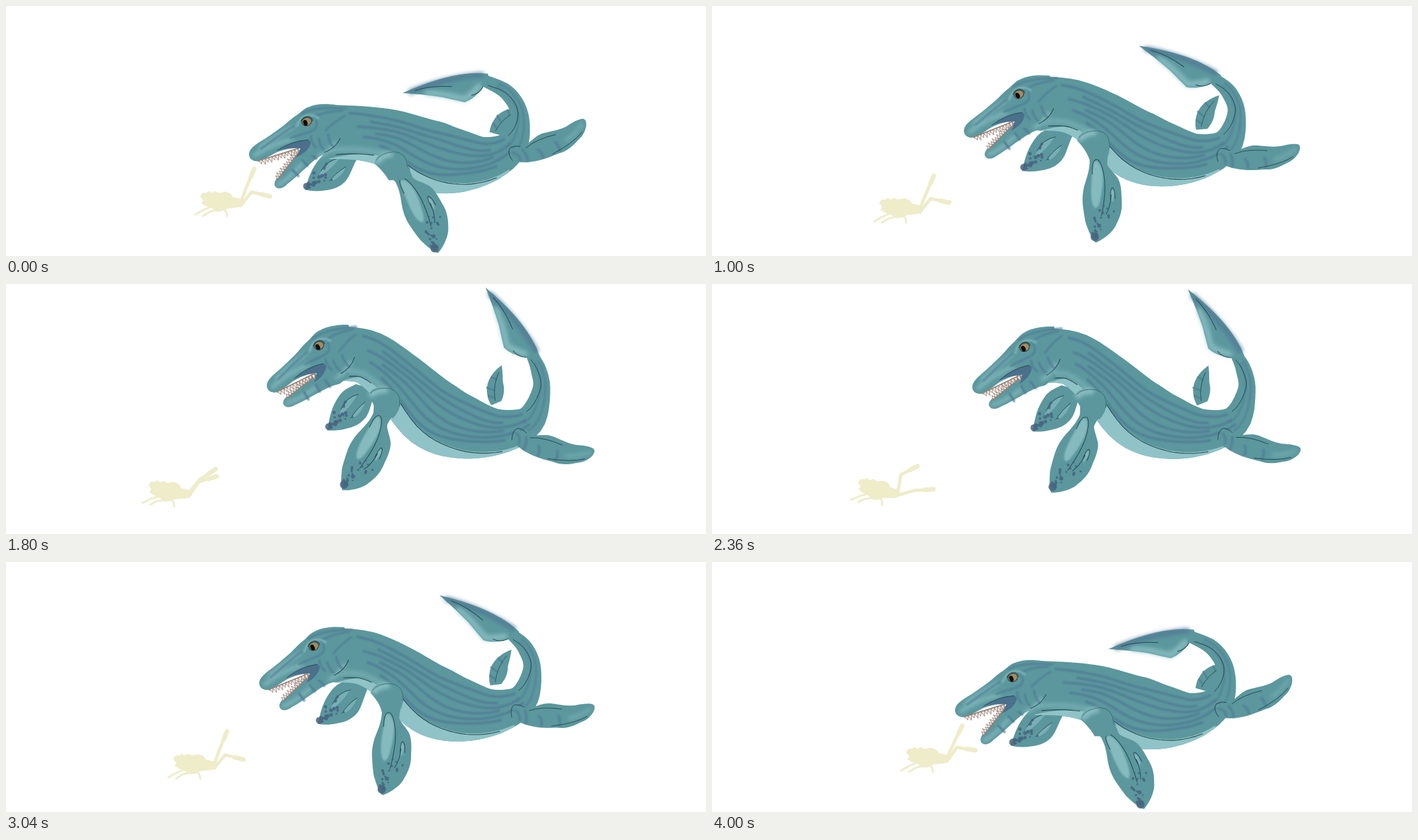
An HTML page that plays this animation: 1080 by 387 pixels, repeating every 4040 ms.

```html
<!DOCTYPE html>
<html lang="en">
<head>
<meta charset="utf-8">
<title>Marine reptile and diver</title>
<style>
html, body { margin: 0; width: 100%; height: 100%; overflow: hidden; background: #fff; }
svg { display: block; width: 100%; height: 100%; }
</style>
</head>
<body>
<svg id="stage" viewBox="0 0 1080 387" fill="none" stroke-linecap="round" stroke-linejoin="round">
  <defs>
    <filter id="soft" filterUnits="userSpaceOnUse" x="-300" y="-300" width="1500" height="1000"><feGaussianBlur stdDeviation="1.3"/></filter>
    <filter id="haze" filterUnits="userSpaceOnUse" x="-300" y="-300" width="1500" height="1000"><feGaussianBlur stdDeviation="3"/></filter>
  </defs>
</svg>
<script>
const LOOP = 4040, TAU = 2 * Math.PI;
const SKIN = '#5b979d', DARK = '#517a94', LIGHT = '#8fc3c7', INK = '#24474f', SPOT = '#48637f', CREAM = '#efecca';
const stage = document.getElementById('stage');
const parts = [], ribbons = [];

function make(tag, attrs = {}, parent = stage) {
  const el = document.createElementNS('http://www.w3.org/2000/svg', tag);
  for (const k in attrs) el.setAttribute(k, attrs[k]);
  return parent.appendChild(el);
}
const fill = (parent, d, color, extra) => make('path', { d, fill: color, ...extra }, parent);
const line = (parent, d, color, width, extra) => make('path', { d, stroke: color, 'stroke-width': width, ...extra }, parent);
const lerp = (a, b, u) => a + (b - a) * u;

let seed = 7;
const rnd = () => (seed = seed * 16807 % 2147483647) / 2147483647;

// A rigid piece that slides and turns between the low and the high pose
function part(low, high, turn, parent = stage) {
  const el = make('g', {}, parent);
  parts.push({ el, low, high, turn });
  return el;
}

// Spots that shrink and spread away from the tip of a limb
function spots(parent, x, y, angle, reach, spread) {
  const dx = Math.cos(angle), dy = Math.sin(angle);
  const count = 20;
  for (let i = 0; i < count; i++) {
    const k = i / count, along = reach * k, side = (rnd() * 2 - 1) * (2 + spread * k);
    make('circle', {
      cx: x + dx * along - dy * side, cy: y + dy * along + dx * side,
      r: i ? 1.2 + 2.6 * rnd() * (1 - k * .6) : spread / 4.2, fill: SPOT, opacity: .85
    }, parent);
  }
}

function teeth(parent, x0, y0, x1, y1, size, count) {
  line(parent, `M${x0} ${y0}L${x1} ${y1}`, '#9d8781', 3);
  const dx = (x1 - x0) / count, dy = (y1 - y0) / count, len = Math.hypot(dx, dy);
  for (let i = 0; i < count; i++) {
    const h = size * (i % 2 ? .75 : 1) / len;
    fill(parent, `M${x0 + dx * i} ${y0 + dy * i}l${dx / 2 - dy * h} ${dy / 2 + dx * h} ${dx / 2 + dy * h} ${dy / 2 - dx * h}Z`,
      '#f1e8e0', { stroke: '#8b746c', 'stroke-width': .8 });
  }
}

// Spine from neck to fluke: low x, y, high x, y, half width
const spine = [
  [490, 195, 518, 107, 42], [548, 197, 560, 114, 42], [598, 207, 606, 149, 46],
  [652, 231, 658, 200, 55], [700, 240, 708, 222, 49], [747, 236, 762, 228, 35],
  [782, 213, 808, 211, 24], [792, 168, 826, 165, 14], [773, 134, 822, 133, 12], [737, 115, 812, 110, 9]
];

// Point at station u along the spine and v across it (-1 back, 1 belly)
function spinePoint(nodes, u, v) {
  const i = Math.min(Math.floor(u), nodes.length - 2), f = u - i;
  const [a, b, c, d] = [-1, 0, 1, 2].map(k => nodes[Math.max(0, Math.min(nodes.length - 1, i + k))]);
  const value = k => b[k] + f / 2 * (c[k] - a[k] + f * (2 * a[k] - 5 * b[k] + 4 * c[k] - d[k] + f * (3 * (b[k] - c[k]) + d[k] - a[k])));
  const rate = k => (c[k] - a[k] + 2 * f * (2 * a[k] - 5 * b[k] + 4 * c[k] - d[k]) + 3 * f * f * (3 * (b[k] - c[k]) + d[k] - a[k])) / 2;
  const tx = rate(0), ty = rate(1), s = value(2) * v / Math.hypot(tx, ty);
  return [value(0) - ty * s, value(1) + tx * s];
}

// A line along the spine, or with a second edge a filled strip
function ribbon(from, to, edge, attrs, parent, edge2) {
  ribbons.push({ el: make('path', attrs, parent), from, to, edge, edge2 });
}
function ribbonPath(nodes, { from, to, edge, edge2 }) {
  const steps = Math.ceil((to - from) * 6);
  const side = fn => Array.from({ length: steps + 1 }, (_, i) => {
    const k = i / steps, u = lerp(from, to, k);
    return spinePoint(nodes, u, fn(k)).map(n => n.toFixed(1)).join(' ');
  });
  return 'M' + side(edge).join('L') + (edge2 ? 'L' + side(edge2).reverse().join('L') + 'Z' : '');
}

// Diver
const diver = make('g', { stroke: CREAM });
const torso = make('g', {}, diver);
fill(torso, 'M-26-6Q-24-13-17-11L-14-14-9-11-4-14 2-11 12-13Q21-12 23-5L37-2 41 5 33 10 16 12 7 16 0 17-9 11-18 8-24 4-21 0Z', CREAM, { 'stroke-width': 1 });
line(torso, 'M-8 9L-22 15-34 22M-2 15L-13 18-22 24M10 13L14 18 15 24', CREAM, 3);
// Joint angles in degrees: mean, cosine and sine part of the kick
const legs = [
  { y: 3, thigh: [-67, -2, -17], shin: [-36, -31, -9] },
  { y: 8, thigh: [-37, -14, 16], shin: [-6, 19, 15] }
].map(leg => ({ ...leg, limb: line(diver, '', CREAM, 5), fin: line(diver, '', CREAM, 7) }));

// Far limbs
const farFore = part([529, 230], [556, 163], [2.3, -5.5]);
fill(farFore, 'M-15-10C-28-5-35-3-42 5C-58 24-60 38-66 57C-56 59-45 59-35 57C-20 55-12 50-5 43C4 33 6 18 15 2Z', SKIN);
fill(farFore, 'M-14 6Q-40 14-46 38Q-26 24-14 6M-4 20Q-22 30-28 44Q-10 36-4 20', LIGHT, { opacity: .55 });
line(farFore, 'M-13 6Q-33 9-42 27M-4 19Q-20 30-28 42', INK, .9);
spots(farFore, -62, 53, -.72, 48, 22);

const farHind = part([754, 197], [756, 184], [19, -20]);
fill(farHind, 'M-8 1C-10-8-9-14-8-18C-5-34 8-46 28-52C26-42 24-36 21-27C20-15 16-8 9 0Z', SKIN);
line(farHind, 'M-5-27L3-20M-7-14L-1-9M7-40L13-34', DARK, 3, { opacity: .7 });
line(farHind, 'M20-43Q4-27 0-4', INK, .8);

// Fluke and body
const fluke = part([737, 115], [812, 110], [-189, -124]);
fill(fluke, 'M-8 9Q18 16 50 14T127 0Q92-8 67-16Q50-23 34-29Q17-26 2-9Q-10-4-8 9Z', SKIN);
line(fluke, 'M8-8Q22-19 34-24L64-12 90-5', LIGHT, 9, { filter: 'url(#haze)', opacity: .8 });
line(fluke, 'M2 9Q25 11 55 9T114 0', DARK, 7, { filter: 'url(#haze)' });
line(fluke, 'M50-2Q80 5 107 1M2-9Q10-20 22-20', INK, 1);

ribbon(0, 9, () => -1, { fill: SKIN }, stage, () => 1);
const haze = make('g', { filter: 'url(#haze)' }), soft = make('g', { filter: 'url(#soft)' });
const bellyLine = k => lerp(.42, .9, k);
ribbon(2, 5.4, bellyLine, { fill: LIGHT }, stage, () => 1);
ribbon(.2, 2.6, k => .98 - .3 * Math.sin(k * 2.4), { fill: LIGHT }, stage, () => 1);
ribbon(2.2, 5, k => bellyLine(k) - .04, { stroke: SKIN, 'stroke-width': 7 }, soft);
ribbon(.3, 2, k => .65 - .1 * k, { stroke: '#75adb2', 'stroke-width': 7 }, haze);
for (let i = 0; i < 6; i++) {
  const v = -.72 + .22 * i, odd = i % 2;
  ribbon(.7 + .45 * odd + .1 * i, 5.9 - .8 * odd, k => v + .05 * Math.sin(k * 7 + i) + .08 * k,
    { stroke: DARK, 'stroke-width': 4, opacity: .75 }, soft);
}
for (const v of [-.1, .45])
  ribbon(5.8, 8.4, () => v, { stroke: DARK, 'stroke-width': 3, opacity: .6 }, soft);
ribbon(2.1, 5, bellyLine, { stroke: INK, 'stroke-width': 1.1 }, stage);
ribbon(.4, 1.5, k => .83 - .12 * k, { stroke: INK, 'stroke-width': 1.1 }, stage);
ribbon(6.2, 8.7, k => -.55 + .5 * Math.sin(k * 3), { stroke: INK, 'stroke-width': 1 }, stage);

// Head, drawn around the eye; the jaw swings on its hinge
const head = part([464, 179], [483, 95], [3.3, -5.5]);
const jaw = part([-7, 42], [-7, 42], [-11, 11.5], head);
fill(jaw, 'M0 0L-41 39C-47 45-49 50-46 54C-42 59-34 57-28 52C-14 44-4 36 8 28C18 21 26 16 36 13L52-2L35-25Z', SKIN);
line(jaw, 'M-42 51Q-25 45 0 23', LIGHT, 4, { filter: 'url(#haze)' });
line(jaw, 'M-17 31L-9 42M0 18L7 28M13 9L22 19', DARK, 3, { filter: 'url(#soft)' });
teeth(jaw, -3, 4, -42, 42, 7, 12);
fill(head, 'M-86 55C-86 47-78 41-70 35C-58 27-50 20-40 12C-30 4-24-4-15-10C-8-16-4-21 2-23C14-29 30-30 48-28L62 25C45 45 20 52 4 52L-7 42C-20 41-35 46-45 51C-55 57-62 62-69 65C-76 67-86 64-86 55Z', SKIN);
const headHaze = make('g', { filter: 'url(#haze)' }, head), headSoft = make('g', { filter: 'url(#soft)' }, head);
line(headHaze, 'M-78 57Q-50 37-20 28M46 30Q38 46 22 52M-70 44Q-45 24-22 10', LIGHT, 4);
line(headSoft, 'M-8-12Q12-25 60-24M10-7Q26-18 54-20M14-3Q20 10 4 16T-24 27M58-12Q44-4 30 12M-68 46Q-42 24-20 8', DARK, 3, { opacity: .75 });
line(headSoft, 'M20 25Q22 35 29 42M34 18Q36 30 43 36M8 22Q8 32 16 39', DARK, 3, { opacity: .8 });
fill(head, 'M-42 47Q-22 31 3 28Q11 29 6 39Q1 49-13 56L-7 42Q-24 41-42 47Z', '#4a708c');
line(head, 'M-43 47Q-22 31 4 28', INK, .9);
line(head, 'M53 23Q47 38 30 46', INK, 1);
teeth(head, -11, 43, -70, 65, -8, 12);
line(head, 'M-15 8Q-10-8 2-10Q12-11 18-6', '#7db5b8', 3, { filter: 'url(#soft)' });
make('ellipse', { rx: 7.5, ry: 6.3, fill: '#a58c60', stroke: '#26353a', transform: 'rotate(-20)' }, head);
make('ellipse', { cx: -2.6, cy: .8, rx: 3.2, ry: 4.6, fill: '#0d0d0d', transform: 'rotate(-25)' }, head);
line(head, 'M-9 0Q-6-8 2-8Q8-7 9-2', '#27434d', 1.2);

// Near hind limb
const hind = part([787, 231], [790, 238], [-18.4, 18.9]);
fill(hind, 'M-8-13Q4-12 16-9C28-12 38-20 52-19C66-18 76-16 88-18C100-21 110-23 116-21Q121-18 117-9C112 0 106 5 98 8C88 14 76 19 65 18C52 19 38 20 25 18Q8 16-3 9Z', SKIN);
line(hind, 'M-3-5Q5 0 4 9M12-5Q16 4 14 14M34 2Q40 9 38 16M64 0Q68 8 66 15', DARK, 4, { filter: 'url(#soft)', opacity: .7 });
line(hind, 'M80 3Q100-3 112-14', LIGHT, 4, { filter: 'url(#haze)', opacity: .6 });
line(hind, 'M18-6Q38-14 68-11M54 16Q90 10 108-2M-8 6Q-13-10-4-14Q4-15 10-11', INK, .9);

// Near front limb: the paddle turns under a steady shoulder
const fore = part([597, 245], [586, 180], [-27, 26]);
fill(fore, 'M-20 0Q-13 15-9 26C-9 38-11 46-15 58C-20 72-21 84-20 95C-18 112-16 124-14 128C-9 142-4 152 0 154C14 148 28 136 32 125C40 110 41 99 40 88C40 74 39 62 34 54C26 43 19 38 18 32Q19 14 23-2Z', SKIN);
const shoulder = part([597, 245], [586, 180], [-6, 6]);
fill(shoulder, 'M-28-4C-26-12-22-16-16-18Q-2-22 12-18Q23-12 23 0Q23 14 14 26L-9 24Q-15 10-28-4Z', SKIN);
line(shoulder, 'M-23-7Q-15-16-2-16', LIGHT, 8, { filter: 'url(#haze)' });
line(shoulder, 'M-25-9Q-16-20 4-19Q23-16 22 6', INK, .8, { opacity: .7 });
const foreSoft = make('g', { filter: 'url(#soft)' }, fore);
line(foreSoft, 'M-15 3Q2-3 19 4M-11 14Q4 8 19 16', DARK, 4, { opacity: .75 });
fill(foreSoft, 'M-3 30Q3 23 9 38T6 92Q0 108-5 94T-3 30M24 72Q32 70 26 92Q22 86 24 72', LIGHT, { opacity: .8 });
line(fore, 'M-5 48Q-6 26 2 25Q9 27 13 50T9 112M23 88Q22 70 26 69Q30 71 30 86M24 80Q23 98 16 110', INK, 1);
spots(fore, -2, 145, -1.38, 52, 27);

function render(t) {
  const x = t / LOOP;
  const beat = x + .012 * Math.sin(TAU * x) - .006 * (1 - Math.cos(2 * TAU * x));
  const p = .51 * (1 - Math.cos(TAU * beat));

  const nodes = spine.map(([x0, y0, x1, y1, w]) => [lerp(x0, x1, p), lerp(y0, y1, p), w]);
  for (const r of ribbons) r.el.setAttribute('d', ribbonPath(nodes, r));
  for (const { el, low, high, turn } of parts)
    el.setAttribute('transform', `translate(${lerp(low[0], high[0], p)} ${lerp(low[1], high[1], p)}) rotate(${lerp(...turn, p)})`);

  // Four kicks per drift out and back
  const drift = (1 - Math.cos(TAU * x)) / 2;
  const c = Math.cos(4 * TAU * x), s = Math.sin(4 * TAU * x), bob = 1 - c;
  diver.setAttribute('transform', `translate(${326 - 84 * drift + 2 * bob} ${301 + 21 * drift - 2.6 * bob})`);
  torso.setAttribute('transform', `rotate(${5 * bob})`);
  for (const { y, thigh, shin, limb, fin } of legs) {
    const step = ([x, y], [mean, a, b], len) => {
      const r = (mean + a * c + b * s) * TAU / 360;
      return [x + len * Math.cos(r), y + len * Math.sin(r)];
    };
    const hip = [36, y + 1.5 * bob], knee = step(hip, thigh, 27);
    limb.setAttribute('d', `M${hip}L${knee} ${step(knee, shin, 14)}`);
    fin.setAttribute('d', `M${step(knee, shin, 16)}L${step(knee, shin, 29)}`);
  }
}

function tick() {
  render(performance.now() % LOOP);
  requestAnimationFrame(tick);
}
tick();
</script>
</body>
</html>
```
